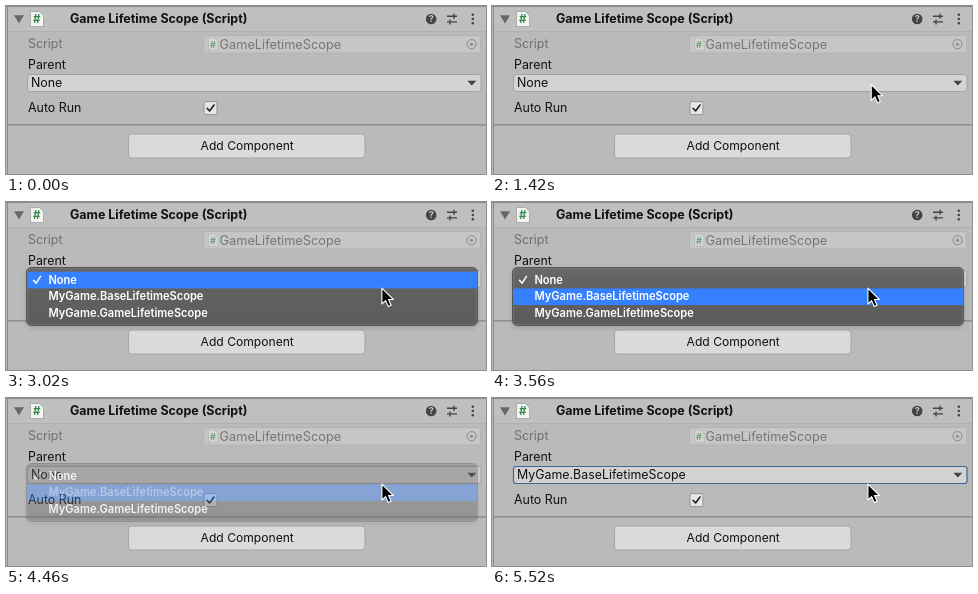
These frames come from a looping animation (480 by 168 pixels, 5.75 s). An HTML page:

```html
<!DOCTYPE html>
<html lang="en">
<head>
<meta charset="utf-8">
<title>Parent picker</title>
<style>
  html, body { margin: 0; width: 100%; height: 100%; overflow: hidden; background: #bbb; }
  svg { display: block; width: 100vw; height: 100vh; }
  text { font: 12.4px Inter, "Liberation Sans", sans-serif; fill: #111; white-space: pre; }
  .title { font-weight: 700; font-size: 12.45px; }
  .dim { fill: #707070; }
  .object { font-size: 12.75px; fill: #767676; }
  .button { font-size: 12.1px; }
  .menu text { font-size: 11.1px; font-weight: 600; fill: #fff; }
  .line { fill: none; stroke-linecap: round; stroke-linejoin: round; }
</style>
</head>
<body>
<svg viewBox="0 0 480 168" preserveAspectRatio="none">
  <defs>
    <filter id="shadow" x="-5%" y="-20%" width="110%" height="150%">
      <feDropShadow dx="0" dy="2" stdDeviation="2.5" flood-color="#000" flood-opacity=".16"/>
    </filter>
    <linearGradient id="glass" x1="0" y1="0" x2="0" y2="1">
      <stop offset="0" stop-color="#696969"/>
      <stop offset=".3" stop-color="#626262"/>
      <stop offset="1" stop-color="#5b5b5b"/>
    </linearGradient>
  </defs>

  <!-- panel -->
  <rect width="480" height="168" fill="#bababa"/>
  <rect x="2" y="1" width="478" height="24.5" fill="#bfbfbf"/>
  <path d="M0 .5H480M1.5 0V168" stroke="#8c8c8c" fill="none"/>
  <path d="M2 25.5H480" stroke="#b0b0b0" fill="none"/>
  <path d="M2 118.8H480" stroke="#858585" stroke-width="1.2" fill="none"/>

  <!-- header -->
  <path d="M8 9.3H18L13 17.6Z" fill="#686868"/>
  <path d="M24.5 5.5H33.5L37.5 9.5V20.5H24.5Z" fill="#f4f4f4" stroke="#9a9a9a" stroke-width=".7"/>
  <text x="26.9" y="17.3" style="font-size:11.5px;font-weight:700;fill:#2c8a43">#</text>
  <text class="title" x="64" y="17.3">Game Lifetime Scope (Script)</text>
  <circle cx="425.2" cy="13" r="5.3" fill="#444"/>
  <text x="425.2" y="16.3" text-anchor="middle" style="font-size:9px;font-weight:700;fill:#ccc">?</text>
  <path d="M441 10.3H451M441 15.9H451M448 7.8V12.8M444 13.4V18.4" stroke="#444" stroke-width="1.4" fill="none"/>
  <g fill="#444">
    <circle cx="466.8" cy="8.8" r="1.25"/><circle cx="466.8" cy="13" r="1.25"/><circle cx="466.8" cy="17.2" r="1.25"/>
  </g>

  <!-- script row -->
  <text class="dim" x="22" y="42.4">Script</text>
  <rect x="197.5" y="29.5" width="277" height="17.5" rx="2" fill="#c6c6c6" stroke="#b2b2b2" stroke-width=".9"/>
  <path d="M202.5 32H209L212 35V44.5H202.5Z" fill="#d4d4d4" stroke="#b2b2b2" stroke-width=".6"/>
  <text x="203.9" y="41.8" style="font-size:9px;font-weight:700;fill:#6ca37a">#</text>
  <text class="object" x="213.6" y="42.6">GameLifetimeScope</text>
  <circle cx="465.5" cy="38.2" r="4.6" fill="none" stroke="#8a8a8a"/>
  <circle cx="465.5" cy="38.2" r="1.5" fill="#8a8a8a"/>

  <!-- parent row -->
  <text x="22" y="62.6">Parent</text>
  <rect id="field" x="21.5" y="68.5" width="453.5" height="17" rx="2.5" fill="#d3d3d3"/>
  <text id="value" x="25" y="81.3"></text>
  <path d="M461.3 74.7H470.3L465.8 79.5Z" fill="#444"/>

  <!-- auto run row -->
  <text x="22" y="106.3">Auto Run</text>
  <rect x="198" y="95.6" width="13" height="13" rx="2" fill="#e6e6e6" stroke="#939393"/>
  <path class="line" d="M201.2 102.4L203.6 105L208 99" stroke="#222" stroke-width="1.6"/>

  <rect x="122.6" y="128" width="236.4" height="24" rx="3" fill="#dadada" stroke="#a5a5a5"/>
  <text class="button" x="241.2" y="144.3" text-anchor="middle">Add Component</text>

  <g id="menu" class="menu">
    <g id="back">
      <rect x="20.5" y="65.5" width="451" height="58" rx="5" fill="url(#glass)" stroke="#484848" stroke-width=".9" filter="url(#shadow)"/>
      <rect x="21.3" y="66.3" width="449.4" height="56.4" rx="4.3" fill="none" stroke="#858585" stroke-width=".6"/>
      <rect id="bar" x="21" width="450.5" height="16.6" fill="#3580ff"/>
      <path class="line" d="M27.5 78.2L30.1 81.2L34.5 74.4" stroke="#fff" stroke-width="1.5"/>
    </g>
    <text x="42.4" y="81.8">None</text>
    <text x="42.4" y="98.3">MyGame.BaseLifetimeScope</text>
    <text x="42.4" y="114.9">MyGame.GameLifetimeScope</text>
  </g>

  <path id="cursor" d="M0 0V15.8L3.7 12.4L6.3 18.3L9.2 17L6.6 11.3H11.5Z" fill="#000" stroke="#fff" stroke-width="1.1" stroke-linejoin="round"/>
</svg>
<script>
const LOOP = 5750;
const $ = id => document.getElementById(id);
const field = $('field'), value = $('value'), cursor = $('cursor');
const menu = $('menu'), back = $('back'), bar = $('bar');
const labels = menu.querySelectorAll('text');
const clamp = v => Math.max(0, Math.min(1, v));
const span = (t, a, b) => clamp((t - a) / (b - a));
const mix = (a, b, p) => a + (b - a) * p;
const smooth = p => p * p * (3 - 2 * p);
const show = (el, on) => el.setAttribute('visibility', on ? 'inherit' : 'hidden');

function pointer(t) {
  const p = 1 - Math.pow(1 - span(t, 530, 1090), 2.6);
  const q = smooth(span(t, 2250, 2950));
  const nudge = t >= 1420 ? 1 : 0;
  const x = mix(396, 380.2, p) - nudge;
  const y = mix(167, 79.5, p) - nudge;
  return [mix(x, 375.9, q), mix(y, 86.2, q)];
}

// Highlighted row, or -1; the chosen row blinks once before the menu fades.
function activeRow(t) {
  if (t < 2130) return -1;
  if (t < 3400) return 0;
  return t >= 4220 && t < 4290 ? -1 : 1;
}

function draw(t) {
  const picked = t >= 4490;
  value.textContent = picked ? 'MyGame.BaseLifetimeScope' : 'None';
  field.setAttribute('stroke', picked ? '#3d6796' : '#a2a2a2');
  field.setAttribute('stroke-width', picked ? 1.2 : 1);

  // Plain labels stay bright longer than the backdrop and the chosen label.
  const fade = 1 - span(t, 4370, 4520);
  const row = activeRow(t);
  show(menu, t >= 2060 && fade > 0);
  back.setAttribute('opacity', fade);
  labels.forEach((label, i) => label.setAttribute('opacity', i === row ? fade : Math.pow(fade, .15)));
  show(bar, row >= 0);
  bar.setAttribute('y', 69.8 + 16.6 * Math.max(row, 0));

  show(cursor, t >= 560);
  cursor.setAttribute('transform', `translate(${pointer(t).join(' ')})`);
}

const start = performance.now();
function tick(now) {
  draw(Math.max(0, now - start) % LOOP);
  requestAnimationFrame(tick);
}
draw(0);
requestAnimationFrame(tick);
</script>
</body>
</html>
```
